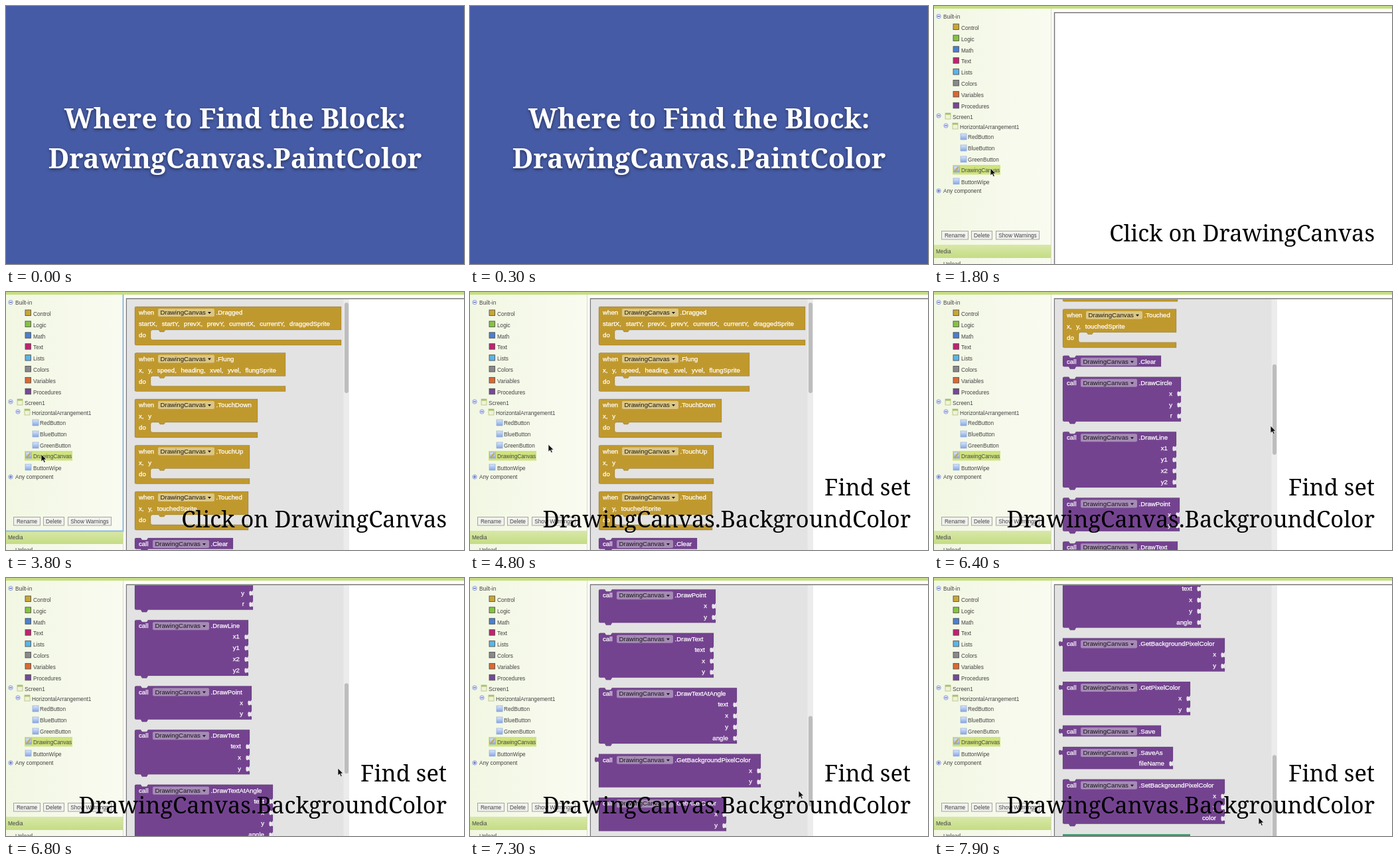
Recreate the animation shown at these times as an HTML page. Size 690 px wide and 388 px high, loop 8000 ms.

```html
<!DOCTYPE html>
<html lang="en">
<head>
<meta charset="utf-8">
<title>Where to Find the Block</title>
<style>
  html, body { margin: 0; width: 100%; height: 100%; overflow: hidden; background: #fff; }
  svg { display: block; width: 690px; height: 388px; }
  text { white-space: pre; }
  .ui { font: 8.25px "Liberation Sans", Arial, sans-serif; fill: #444; }
  .block { font: 9.7px "Liberation Sans", Arial, sans-serif; fill: #fff; stroke: #fff; stroke-width: .25px; }
  .block .field { fill: #161616; stroke: none; }
  .args { word-spacing: 4px; }
  .end { text-anchor: end; }
  .caption { font: 300 34.5px "Noto Serif", serif; text-anchor: end; fill: #000; }
  .title { font: 700 41.2px "Noto Serif", serif; text-anchor: middle; fill: #fff; filter: drop-shadow(0 2px 2px #0007); }
</style>
</head>
<body>
<svg viewBox="0 0 690 388">
  <defs>
    <linearGradient id="panel"><stop stop-color="#f2f7e3"/><stop offset="1" stop-color="#f9fbf1"/></linearGradient>
    <linearGradient id="bar" x2="0" y2="1"><stop stop-color="#d8e8a8"/><stop offset="1" stop-color="#c5dc85"/></linearGradient>
    <linearGradient id="icon" x2="0" y2="1"><stop stop-color="#dbe7fb"/><stop offset="1" stop-color="#84a5e3"/></linearGradient>
    <clipPath id="view"><path d="M182 11H517V388H182z"/></clipPath>
  </defs>
  <g id="app">
    <rect width="690" height="388" fill="#fff"/>
    <rect width="176" height="388" fill="url(#panel)"/>
    <rect width="690" height="4" fill="#c6de82"/>
    <path d="M176.5 4V388" stroke="#d3ddc0"/>
    <path d="M690 10H181.5V388" fill="none" stroke="#777" stroke-width="1.5"/>
    <g id="tree" class="ui"></g>
    <rect y="359" width="176" height="20" fill="url(#bar)"/>
    <text x="3" y="372" class="ui" font-weight="bold">Media</text>
    <text x="14" y="391" class="ui">Upload</text>
    <path id="focus" d="M0 359.5H176.5V4" fill="none" stroke="#8fb9dc" stroke-width="2"/>
    <g id="flyout" clip-path="url(#view)">
      <rect x="182" y="11" width="335" height="377" fill="#e3e3e3"/>
      <g id="blocks" class="block"></g>
      <rect x="508.5" y="11" width="8.5" height="377" fill="#ececec"/>
      <rect id="thumb" x="510" y="16" width="6" height="136" rx="3" fill="#bdbdbd"/>
    </g>
    <text id="click" class="caption" x="664" y="354">Click on DrawingCanvas</text>
    <g id="find" class="caption">
      <text x="664" y="306">Find set</text>
      <text x="664" y="354">DrawingCanvas.BackgroundColor</text>
    </g>
    <path id="mouse" d="M0 0V11L2.6 8.7L4.4 12.6L6.3 11.7L4.6 8H8z" fill="#111" stroke="#fff" stroke-width=".7"/>
  </g>
  <g id="intro">
    <rect width="690" height="388" fill="#465ba5"/>
    <text class="title" x="345" y="184">Where to Find the Block:</text>
    <text class="title" x="345" y="244">DrawingCanvas.PaintColor</text>
  </g>
</svg>
<script>
const $ = id => document.getElementById(id);
const text = (x, y, s, cls = '') => `<text x="${x}" y="${y}" class="${cls}">${s}</text>`;
const rect = (x, y, w, h, fill, more = '') =>
  `<rect x="${x}" y="${y}" width="${w}" height="${h}" fill="${fill}" ${more}/>`;

// Component tree
const toggle = (x, y, plus) =>
  `<circle cx="${x}" cy="${y}" r="3.2" fill="#e5e9fb" stroke="#8a98d6" stroke-width=".9"/>
   <path d="M${x - 2} ${y}h4${plus ? 'm-2-2v4' : ''}" stroke="#4656b0"/>`;
const icon = (x, y) => rect(x, y, 9, 9, 'url(#icon)', 'stroke="#91a9d6" stroke-width=".7"');
const layoutIcon = (x, y) =>
  rect(x, y, 8, 9, '#eef3d5', 'stroke="#a9b77b" stroke-width=".7"') + rect(x, y, 8, 2.5, '#a9c068');

const drawers = [['Control', '#c8a735'], ['Logic', '#86c440'], ['Math', '#4a80d0'], ['Text', '#c1236f'],
  ['Lists', '#5cb4e6'], ['Colors', '#898989'], ['Variables', '#da6a31'], ['Procedures', '#774798']];
const button = (x, w, s) => rect(x + .5, 338.5, w, 12.5, '#f1f1ee', 'stroke="#a5a5a0"') +
  `<text x="${x + w / 2 + .5}" y="347.7" text-anchor="middle">${s}</text>`;

$('tree').innerHTML =
  toggle(7, 15.5) + text(14, 19, 'Built-in') +
  drawers.map(([name, color], i) => {
    const y = 27 + i * 16.9;
    return rect(29, y, 8.5, 8.5, color, 'stroke="#555" stroke-width=".9"') + text(41, y + 8.7, name);
  }).join('') +
  toggle(7, 165) + layoutIcon(17, 161) + text(28, 170, 'Screen1') +
  toggle(18, 180) + layoutIcon(28, 176) + text(39, 185, 'HorizontalArrangement1') +
  ['RedButton', 'BlueButton', 'GreenButton'].map((name, i) =>
    icon(40, 192 + i * 17) + text(51, 200.3 + i * 17, name)).join('') +
  rect(28, 239, 72, 14.5, '#cfe37c') + icon(29.5, 241) +
  '<path d="M31 249l6-7" stroke="#d9a42c" stroke-width="2"/>' + text(41, 250.3, 'DrawingCanvas') +
  icon(29, 259) + text(41, 268, 'ButtonWipe') +
  toggle(7, 278, true) + text(14, 281.3, 'Any component') +
  button(11, 40, 'Rename') + button(56, 31, 'Delete') + button(93, 65, 'Show Warnings');

// Blocks in the flyout
const head = (y, word, x, tint, name) => text(200, y + 12, word) +
  rect(x, y + 3, 85, 12, tint, 'rx="2" stroke="none"') + text(x + 3.5, y + 12, 'DrawingCanvas', 'field') +
  `<path d="M${x + 75} ${y + 8}h5l-2.5 3z" class="field"/>` + text(x + 87.5, y + 12, '.' + name);
const shape = (d, fill) => `<path d="${d}" fill="${fill}" stroke="#0004" stroke-width=".6"/>`;

function eventBlock(y, name, args, right) {
  const d = `M194 ${y + 2}q0-2 2-2H${right}V${y + 35}H240l-2 3h-6l-2-3H221q-3 0-3 3v9q0 3 3 3H${right}V${y + 58}H196q-2 0-2-2z`;
  return shape(d, '#c0992e') + head(y, 'when', 229, '#dcc684', name) +
    text(200, y + 29, args, 'args') + text(200, y + 46, 'do');
}

function callBlock(y, name, rows, right, output) {
  const bottom = y + 16.5 + rows.length * 16.8;
  const d = output
    ? `M194 ${y}H${right}V${bottom}H194V${y + 12}l-2-1q-4 3-4-3q0-5 4-2l2-1z`
    : `M194 ${y + 2}q0-2 2-2h7l2 3h7l2-3H${right}V${bottom}H214l-2 3.5h-7l-2-3.5H196q-2 0-2-2z`;
  return shape(d, '#744390') + head(y, 'call', 221, '#a58bb5', name) + rows.map((s, i) => {
    const mid = y + 25 + i * 16.8;
    return text(right - 13, mid + 3, s, 'end') +
      `<path d="M${right + .4} ${mid - 5}v9l-2-1q-4 3-4-3q0-5 4-2z" fill="#e9e6ec" stroke="none"/>`;
  }).join('');
}

const events = [
  ['Dragged', 'startX, startY, prevX, prevY, currentX, currentY, draggedSprite', 505],
  ['Flung', 'x, y, speed, heading, xvel, yvel, flungSprite', 421],
  ['TouchDown', 'x, y', 379], ['TouchUp', 'x, y', 367], ['Touched', 'x, y, touchedSprite', 365]];
const calls = [
  ['Clear', '', 342], ['DrawCircle', 'x y r', 372], ['DrawLine', 'x1 y1 x2 y2', 365],
  ['DrawPoint', 'x y', 370], ['DrawText', 'text x y', 367], ['DrawTextAtAngle', 'text x y angle', 402],
  ['GetBackgroundPixelColor', 'x y', 438, true], ['GetPixelColor', 'x y', 386, true],
  ['Save', '', 342, true], ['SaveAs', 'fileName', 360, true], ['SetBackgroundPixelColor', 'x y color', 438]];

let blocks = events.map(([name, args, right], i) => eventBlock(22 + i * 69.5, name, args, right)).join('');
let callY = 370;
for (const [name, args, right, output] of calls) {
  const rows = args ? args.split(' ') : [];
  blocks += callBlock(callY, name, rows, right, output);
  callY += 32.1 + rows.length * 16.8;
}
$('blocks').innerHTML = blocks + rect(194, callY, 192, 17, '#2f9a66', 'stroke="none"');

// Motion: each key is [time, value, ...]
function at(keys, t) {
  const i = keys.findIndex(k => k[0] > t);
  if (i === 0) return keys[0].slice(1);
  if (i < 0) return keys[keys.length - 1].slice(1);
  const a = keys[i - 1], b = keys[i], p = (t - a[0]) / (b[0] - a[0]);
  return a.slice(1).map((v, n) => v + (b[n + 1] - v) * p);
}
const scrollKeys = [[6020, 0], [6400, 274], [6800, 421], [7900, 741]];
const mouseKeys = [[3050, 85, 244], [3400, 53, 244], [4600, 53, 244], [4900, 150, 222], [5300, 410, 140],
  [5600, 511, 109], [6020, 511, 109], [6400, 507, 201], [6800, 500, 286], [7900, 489, 360]];
const show = (id, on) => $(id).setAttribute('visibility', on ? 'inherit' : 'hidden');

function frame() {
  const t = performance.now() % 8000;
  const [scroll] = at(scrollKeys, t);
  show('intro', t < 1800);
  show('app', t >= 1800);
  show('flyout', t >= 3800);
  show('focus', t >= 3800 && t < 4700);
  show('click', t < 4300);
  show('find', t >= 4300);
  $('blocks').setAttribute('transform', `translate(0 ${-scroll})`);
  $('thumb').setAttribute('y', 16 + scroll / 2.96);
  $('mouse').setAttribute('transform', `translate(${at(mouseKeys, t)})`);
  requestAnimationFrame(frame);
}
frame();
</script>
</body>
</html>
```
